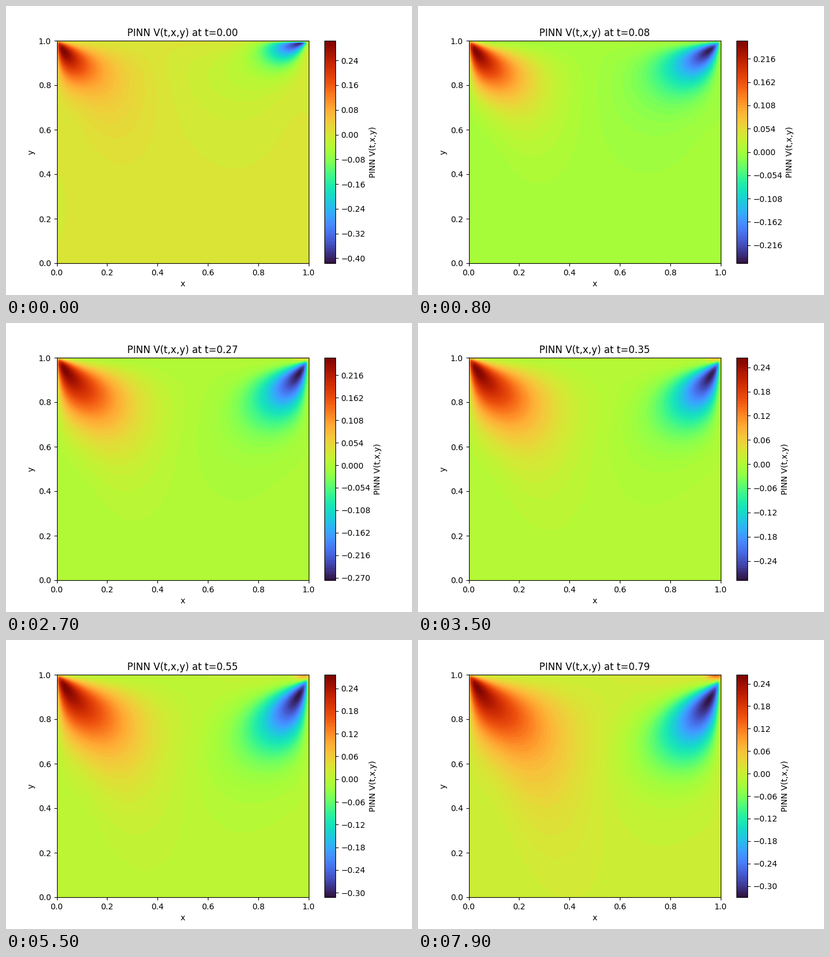
These frames come from a looping animation (700x500 px, 8 s). A matplotlib script:

```python
import numpy as np
import matplotlib.pyplot as plt
from matplotlib.animation import FuncAnimation

FRAMES, INTERVAL = 80, 100

x, y = np.meshgrid(np.linspace(0, 1, 100), np.linspace(0, 1, 100))
d = 1 - y   # distance from the lid
e = 1 - x   # distance from the right wall

# Extreme values of the field over time
KEY_T = [0, .08, .17, .27, .55, .79]
TOP = [.302, .256, .2455, .2565, .273, .261]
LOW = [.414, .256, .2625, .2745, .311, .3298]


def hump(u, k):
    """Unit-height bump with its peak at u = 1."""
    return (u * np.exp(1 - u)) ** k


def bell(u, v):
    return np.exp(-u ** 2 - v ** 2)


def petal(across, down, radius, rise, a, b):
    """Corner lobe: angular profile times radial decay."""
    r = np.hypot(across, down)
    s = np.clip(np.arctan2(across, np.maximum(down, 0)) / (np.pi / 2), 0, 1)
    m = a / (a + b)
    angular = s ** a * (1 - s) ** b / (m ** a * (1 - m) ** b)
    return angular * np.exp(-(r / radius) ** 2) * (1 - np.exp(-r / rise))


def left_lobe(t, top):
    radius = .285 - .11 * np.exp(-t / .2)
    core = 1.1 * top * petal(x, d, radius, .018, .95, 1.9)
    axis = .14 + .05 * t + .22 * d
    tail = hump(x / axis, 2.5 + 6 * d) * hump(d / (.17 + .13 * t), 1.8)
    return core + (.043 + .022 * t) * tail


def right_lobe(t, low):
    start = np.exp(-t / .03)    # brief start-up transient
    early = np.exp(-t / .15)    # slower turn towards the wall
    core = 1.1 * low * petal(e, d - .025 * t,
                             .19 + .165 * t - .03 * start,
                             .02 - .012 * start + .015 * t,
                             1.1 + .9 * early, 2.9 - 2.4 * early)
    axis = .06 + .2 * early + (.42 - .33 * early) * d
    tail = hump(e / axis, 4) * hump(d / (.15 + .07 * t), 1.8)
    return core + (.026 + .01 * t) * tail


def field(t):
    top, low = np.interp(t, KEY_T, TOP), np.interp(t, KEY_T, LOW)
    upper = 1 / (1 + np.exp(-(y - .62 + .12 * t) / .05))
    base = .0017 - .0025 * np.exp(-e / .15) * upper
    base -= .0032 * np.exp(-t / .15) * bell(x / .045, (y - .25) / .2)
    lid = t * (.18 * bell((e - .02) / .035, d / .018)
               + .015 * bell((x - .75) / .2, d / .05))
    v = left_lobe(t, top) - right_lobe(t, low) + base + lid
    return np.where(v > 0, v * top / v.max(), -v * low / v.min())


fig = plt.figure(figsize=(7, 5), dpi=100)


def draw(i):
    t = i / 100
    fig.clear()
    ax = fig.add_subplot()
    cf = ax.contourf(x, y, field(t), levels=100, cmap="turbo")
    fig.colorbar(cf, ax=ax, label="PINN V(t,x,y)")
    ax.set_title(f"PINN V(t,x,y) at t={t:.2f}")
    ax.set_xlabel("x")
    ax.set_ylabel("y")
    return []


anim = FuncAnimation(fig, draw, frames=FRAMES, interval=INTERVAL,
                     repeat=True, repeat_delay=0)
plt.show()
```
